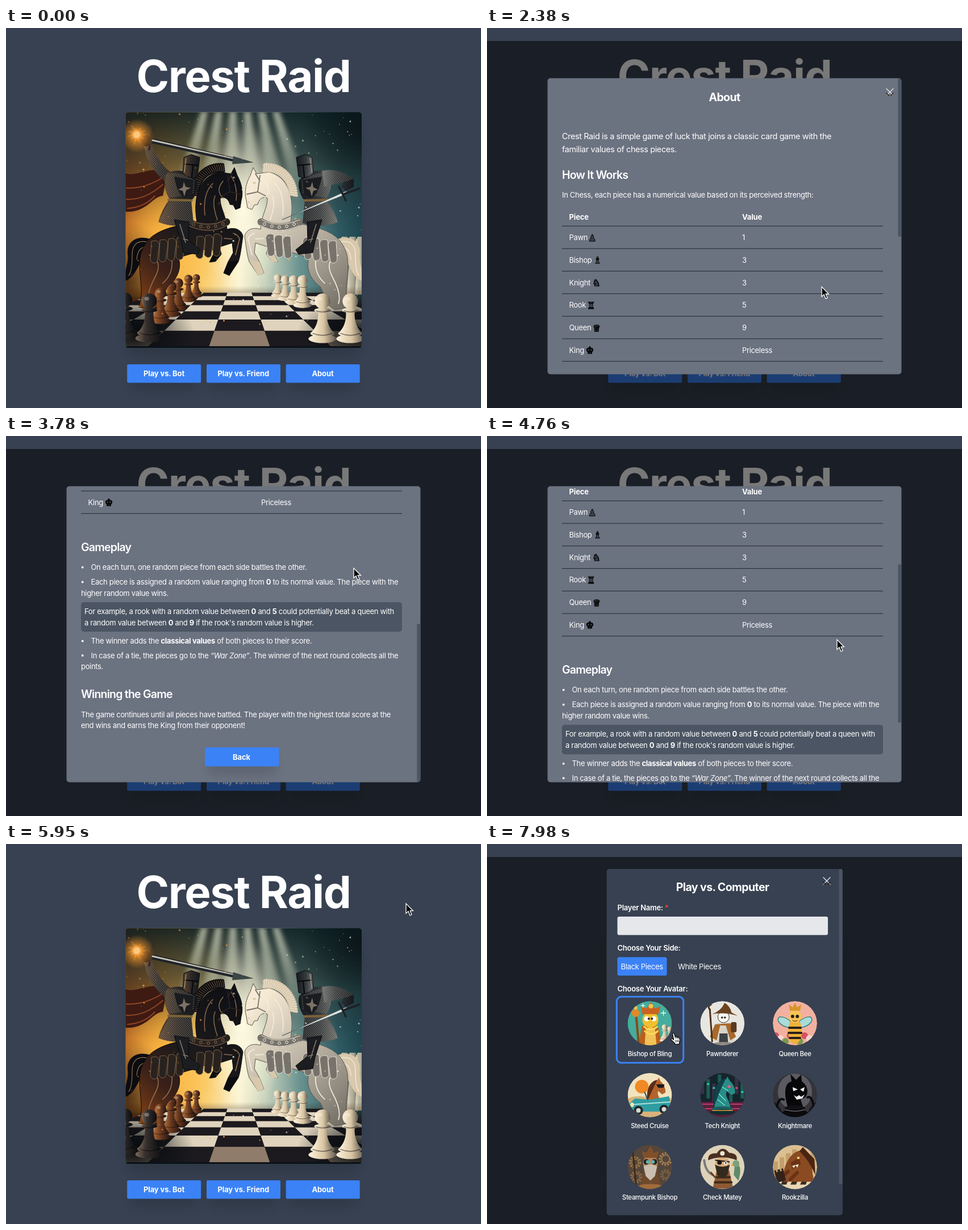
Recreate the animation shown at these times as an HTML page. Size 836x670 px, loop 8000 ms.

```html
<!DOCTYPE html>
<html lang="en">
<head>
<meta charset="utf-8">
<title>Crest Raid</title>
<style>
html, body { margin: 0; width: 100%; height: 100%; overflow: hidden; background: #374151; }
svg { display: block; width: 100vw; height: 100vh; }
text { font-family: Inter, "Open Sans", sans-serif; font-size: 13px; letter-spacing: -.025em; fill: #fff; }
.b { font-weight: 700; letter-spacing: -.01em; }
.h { font-size: 19.5px; font-weight: 600; letter-spacing: -.04em; }
.t { font-size: 19.5px; font-weight: 700; letter-spacing: -.03em; }
.l { font-weight: 600; letter-spacing: -.02em; }
.s { font-size: 11.4px; font-weight: 500; }
.m { text-anchor: middle; }
.g { font: 16.5px "DejaVu Sans", sans-serif; fill: #3c4047; stroke: #000; stroke-width: .8; }
</style>
</head>
<body>
<script>
const BLUE = '#3b82f6';
const text = (x, y, s, cls = '') => `<text x="${x}" y="${y}" class="${cls}">${s}</text>`;
const bold = s => `<tspan font-weight="700">${s}</tspan>`;
const rect = (x, y, w, h, fill, r = 0, more = '') =>
  `<rect x="${x}" y="${y}" width="${w}" height="${h}" rx="${r}" fill="${fill}" ${more}/>`;
const circle = (x, y, r, fill, more = '') => `<circle cx="${x}" cy="${y}" r="${r}" fill="${fill}" ${more}/>`;
const oval = (x, y, rx, ry, fill, more = '') =>
  `<ellipse cx="${x}" cy="${y}" rx="${rx}" ry="${ry}" fill="${fill}" ${more}/>`;
const path = (d, fill, more = '') => `<path d="${d}" fill="${fill}" ${more}/>`;
const line = (d, stroke, w, more = '') => path(d, 'none', `stroke="${stroke}" stroke-width="${w}" stroke-linecap="round" ${more}`);
const group = (s, more = '') => `<g ${more}>${s}</g>`;
const range = n => [...Array(n).keys()];
const shadow = (x, y, w, h) => rect(x + 4, y + 22, w - 8, h - 8, '#000', 12, 'opacity=".13" filter="url(#soft)"');
const gradient = (id, stops, dir = '') => `<linearGradient id="${id}" ${dir}>` +
  stops.map(([o, c, a = 1]) => `<stop offset="${o}" stop-color="${c}" stop-opacity="${a}"/>`).join('') + '</linearGradient>';
const glow = (id, c) => `<radialGradient id="${id}"><stop offset="0" stop-color="${c}"/>` +
  `<stop offset="1" stop-color="${c}" stop-opacity="0"/></radialGradient>`;

let seed = 7;
const rnd = () => (seed = (seed * 16807) % 2147483647) / 2147483647;

const down = 'x2="0" y2="1"';
const rise = 'x1="0" y1="1" x2=".7" y2="0"';
const defs = `<defs>
<filter id="soft" x="-60%" y="-300%" width="220%" height="700%"><feGaussianBlur stdDeviation="10"/></filter>
<filter id="haze"><feGaussianBlur stdDeviation="4"/></filter>
<clipPath id="art"><rect x="210.5" y="148.5" width="415.5" height="415.5" rx="5"/></clipPath>
<clipPath id="card"><rect x="106.5" y="88.5" width="623" height="522" rx="5"/></clipPath>
<clipPath id="disc"><circle r="39"/></clipPath>
<pattern id="mail" width="4" height="4" patternUnits="userSpaceOnUse"><path d="M0 1q1 2 2 0t2 0M-1 3q1 2 2 0t2 0t2 0" fill="none" stroke="#b9ab98" stroke-width=".6" opacity=".55"/></pattern>` +
  gradient('sky', [[0, '#b55a1a'], [.15, '#e8952f'], [.32, '#f8cf76'], [.48, '#fbf4d2'], [.6, '#c2cfba'], [.74, '#68918f'], [.9, '#2f5a63'], [1, '#1e4650']]) +
  gradient('top', [[0, '#0b1c20', .92], [.2, '#1a2725', .66], [.5, '#1a2725', 0]], down) +
  gradient('ray', [[0, '#eef3d8', .85], [1, '#eef3d8', 0]], down) +
  gradient('floor', [[0, '#2a1408', 0], [.4, '#1c1210', .9], [1, '#0a0d12']], down) +
  gradient('dark', [[0, '#7d6a58'], [.35, '#37302e'], [1, '#0b0c10']]) +
  gradient('brown', [[0, '#c27a40'], [.5, '#6a3a20'], [1, '#21120e']]) +
  gradient('light', [[0, '#fff4de'], [.55, '#d9c5a2'], [1, '#5f594f']]) +
  gradient('black', [[0, '#8a4416'], [.3, '#3a2018'], [.55, '#1d1a1c'], [1, '#101116']], rise) +
  gradient('white', [[0, '#6d6960'], [.35, '#a39c90'], [.6, '#c4bbab'], [1, '#f6ead4']], rise) +
  gradient('coat', [[0, '#5e4630'], [.5, '#2c2827'], [1, '#15161a']]) +
  gradient('steel', [[0, '#6e7170'], [.45, '#33383c'], [1, '#15191d']]) +
  glow('fire', '#ff9a2c') + glow('sun', '#fffbe2') + glow('amber', '#ffc04a') + glow('night', '#050a0e') + '</defs>';

// Cover picture
const pawn = (x, y, h, fill) => group(
  path('M-9-64C-8-40-14-30-22-20H22C14-30 8-40 9-64Z', `url(#${fill})`) +
  circle(0, -84, 16, `url(#${fill})`) + oval(0, -65, 17, 5, `url(#${fill})`) +
  oval(0, -17, 25, 7, `url(#${fill})`) + oval(0, -6, 29, 9, `url(#${fill})`) +
  line('M-20-17Q0-9 20-17M-13-64Q0-59 13-64', '#000', 2, 'opacity=".45"') + oval(-5, -89, 5, 4, '#fff', 'opacity=".3"'),
  `transform="translate(${x} ${y}) scale(${h / 100})"`);

// A crest of hair strands around the neck
const strands = (c, w) => range(22).map(i => {
  const a = 3.25 + i * .078, x = 376 + 40 * Math.cos(a), y = 298 + 46 * Math.sin(a);
  return line(`M${x.toFixed(1)} ${y.toFixed(1)}l${(11 * Math.cos(a - .3)).toFixed(1)} ${(12 * Math.sin(a - .3)).toFixed(1)}`, c, w);
}).join('');

const horse = (fill, mane, trim, shine, edge) =>
  path('M262 376C238 362 212 372 214 398C217 418 205 430 211 446C232 436 234 408 250 394Z', mane) +
  line('M254 378Q222 370 222 400T216 436M250 386Q232 384 230 408', shine, 1.2) +
  path('M336 342C328 296 342 262 374 254L396 257 402 246 407 260C415 274 418 290 414 304L412 317 404 320 400 312 394 311C392 302 385 296 377 300C376 316 388 330 389 355C404 350 415 357 417 367C414 387 413 400 409 412L393 436 383 432 391 412 400 396 398 379 376 386 379 399 369 411 358 413 366 397 361 385C338 398 318 398 304 406C310 428 298 446 284 456L268 490 258 497 234 492 238 472C240 440 226 408 246 380C262 354 304 348 336 342Z', fill, `stroke="${edge}"`) +
  strands(mane, 5) + strands(shine, .8) +
  line('M396 260Q408 280 405 304M382 300Q368 286 382 270M350 330Q346 292 364 274M372 338Q362 310 368 296', shine, 1.4) +
  line('M400 362Q408 364 411 372L404 400M384 371L398 372M252 400Q278 410 262 440T252 486M292 410Q294 434 276 450', shine, 1.6) +
  path('M409 410L393 437 383 432 391 412ZM379 399L369 412 358 413 366 397Z', mane) +
  line('M320 342Q358 360 388 342', trim, 13) + line('M320 338Q358 354 387 338M320 348Q358 366 389 348', shine, 1) +
  range(5).map(i => circle(330 + i * 13, 346 + 5 * Math.sin(i * .8), 2.4, 'none', `stroke="${shine}"`)).join('') +
  line('M390 260L394 289 413 293M394 289L380 296M398 257L390 270', trim, 1.8) + oval(400, 273, 2.6, 2, mane) + circle(410, 307, 1.4, mane) +
  range(7).map(i => path(`M${256 + i * 15 + (i > 3 ? 20 : 0)} ${376 - i * 2}q12-4 14 6l-4 30q-6 6-12-2Z`, trim, `stroke="${shine}" stroke-width=".8"`)).join('');

const rider = coat =>
  path('M280 258Q300 246 322 256L336 268Q340 282 330 300L326 304 330 344Q296 354 268 342Q274 320 288 302Q276 282 280 258Z', coat) +
  path('M282 258Q300 250 332 268L330 292 288 300Q276 280 282 258ZM288 304L326 304 330 344Q296 354 268 342Z', 'url(#mail)') +
  path('M296 262L330 268 328 294 316 300Q302 296 296 262Z', '#1b1c20') + line('M286 303L327 304', '#7d6238', 4) +
  path('M313 228L326 223 341 228 337 262Q324 268 311 256Z', coat, 'stroke="#0c0d10"') +
  line('M315 240L338 242M329 242L327 262', '#08090b', 2.2) + line('M317 230L314 254', '#a99a86', 1.2) +
  path('M296 338L322 342 321 374 342 391 337 399 312 396 308 376Z', '#1c1d21', 'stroke="#08090b"') + line('M306 346L316 378M312 372L320 374', '#857868', 1.6) +
  path('M313 271l3 9 9 2-8 4-3 11-3-10-8-2 8-4Z', '#8d8272', 'opacity=".85"');

const row = k => 405 + 1 / (.00637 + .0014 * k);
const tile = (c, k) => {
  const at = (i, y) => `${411 + (i - .5) * 109 * (y - 405) / 159} ${y}`, a = row(k), b = row(k + 1);
  const lit = (c + k) % 2 === 0;
  return path(`M${at(c, a)}L${at(c + 1, a)} ${at(c + 1, b)} ${at(c, b)}Z`, lit ? (k ? '#dfd3bd' : '#8f7c6a') : '#1c1a1e');
};
const board = rect(210, 455, 416, 110, 'url(#floor)') +
  range(7).map(k => range(7).map(c => tile(c - 3, k)).join('')).join('') +
  oval(222, 540, 110, 70, 'url(#night)') + oval(622, 540, 110, 70, 'url(#night)');

const sparks = range(260).map(() => {
  const x = 210 + rnd() * 416, y = 150 + rnd() * 380, warm = x < 400 || rnd() < .12;
  return circle(x.toFixed(1), y.toFixed(1), (.3 + rnd() * rnd() * 1.6).toFixed(1), warm ? '#ffa23f' : '#e8efe6', `opacity="${(.3 + rnd() * .6).toFixed(2)}"`);
}).join('');

const cover = group(
  rect(210, 148, 417, 417, 'url(#sky)') + rect(210, 148, 417, 417, 'url(#top)') +
  oval(290, 390, 120, 120, 'url(#amber)') + oval(418, 320, 80, 150, 'url(#sun)') +
  oval(214, 450, 80, 110, 'url(#night)', 'opacity=".6"') + oval(630, 180, 110, 90, 'url(#night)', 'opacity=".6"') +
  group(range(6).map(i => path(`M${344 + i * 25} 146h11L${322 + i * 44} 310h-32Z`, 'url(#ray)')).join(''), 'filter="url(#haze)" opacity=".8"') +
  path('M210 256C232 264 254 240 284 256L276 296C258 296 248 326 210 324Z', '#3d1a12') +
  line('M212 282Q246 284 278 262M212 302Q244 304 276 276M214 318Q244 316 262 296', '#8a4424', 2) +
  range(3).map(i => path(`M${586 + i * 14} 470l5-70-5-22 5-10h10l5 10-5 22 6 70Z`, 'url(#light)', 'opacity=".75"')).join('') +
  board +
  [[335, 474, 40], [321, 482, 47], [303, 497, 56], [290, 508, 62]].map(p => pawn(...p, 'brown')).join('') +
  [[478, 474, 40], [491, 480, 44], [506, 486, 50], [522, 492, 56]].map(p => pawn(...p, 'light')).join('') +
  group(horse('url(#white)', '#d8c8ac', '#77736c', '#f7efdf', '#5a554d'), 'transform="matrix(-1 0 0 1 837 0)"') +
  horse('url(#black)', '#0c0c10', '#28221f', '#8f6f50', '#0c0a0a') +
  pawn(272, 520, 62, 'brown') +
  path('M292 256Q276 246 264 222L256 202 242 206 248 228Q260 256 282 272Z', 'url(#coat)') + path('M292 256Q276 246 264 222L256 202 242 206 248 228Q260 256 282 272Z', 'url(#mail)') +
  oval(247, 199, 8, 10, '#2a211c') + rider('url(#coat)') +
  group(rider('url(#steel)'), 'transform="matrix(-1 0 0 1 852 0)"') +
  path('M556 252Q584 246 612 266L612 280 598 288 590 280 594 272 560 280Z', 'url(#steel)') + path('M556 252Q584 246 612 266L594 272 560 280Z', 'url(#mail)') +
  path('M256 194L404 229 402 236 255 203Z', '#20242a') + path('M256 196L404 230 404 232 256 199Z', '#c8c4b8') +
  path('M400 226L436 237 398 240Z', '#3b4646') + line('M258 178L252 214', '#3a2a20', 4) +
  path('M600 287L596 294 486 338Z', '#dfe4e2', 'stroke="#3c4a4e" stroke-width=".7"') + line('M586 280L598 304M594 293L622 283', '#1d2126', 3.5) +
  circle(231, 190, 30, 'url(#fire)') + circle(230, 188, 14, 'url(#fire)') + circle(230, 188, 9, 'url(#sun)') +
  range(11).map(i => line(`M230 188l${(16 * Math.cos(i * 2.3)).toFixed(1)} ${((9 + i) * Math.sin(i * 2.3)).toFixed(1)}`, '#ffb347', .8, 'opacity=".7"')).join('') +
  sparks +
  pawn(209, 548, 82, 'dark') + pawn(252, 552, 84, 'dark') + pawn(557, 553, 85, 'light') + pawn(606, 553, 85, 'light') +
  rect(210, 561, 417, 4, '#0b1218'), 'clip-path="url(#art)"');

const buttons = [['Play vs. Bot', 213.2], ['Play vs. Friend', 353], ['About', 492.7]].map(([s, x], i) =>
  shadow(x, 593, 130, 32.5) + rect(x, 593, 130, 32.5, BLUE, 2, `id="btn${i}"`) + text(x + 64.8, 614, s, 'b m')).join('');

const home = `<text x="418" y="113" class="m" style="font-size:78px;font-weight:700;letter-spacing:-.018em">Crest Raid</text>` +
  shadow(210.5, 148.5, 415.5, 415.5) + cover + buttons;

// About panel, laid out as it stands when scrolled to the end
const swords = (x, y) => group(
  line('M-6-6L5 5M6-6L-5 5', '#e5e7eb', 1.4) + line('M2 6L6 2M-2 6L-6 2', '#15181d', 1.4) + line('M5 5l2 2M-5 5l-2 2', '#8a7350', 1.6),
  `transform="translate(${x} ${y})"`);
const pieces = [['Pawn', 1, '♟', 178], ['Bishop', 3, '♝', 187], ['Knight', 3, '♞', 185], ['Rook', 5, '♜', 176], ['Queen', 9, '♛', 185.5], ['King', 'Priceless', '♚', 173.5]];
const rows = pieces.map(([name, value, icon, x], i) => {
  const y = -77 + i * 39.75;
  return text(144.5, y, name) + `<text x="${x}" y="${y + 1.5}" class="g">${icon}</text>` + text(449, y, value);
}).join('') + range(7).map(i => rect(132, -102.3 + i * 39.75, 565, 1, '#1f2937')).join('');
const bullet = (y, s) => circle(134.7, y - 4.5, 1.9, '#fff') + text(149.5, y, s);
const lead = (y, s) => `<text x="132" y="${y}" style="font-size:14.4px">${s}</text>`;

const about = text(418, -322, 'About', 't m') + swords(709, -338) +
  lead(-255, 'Crest Raid is a simple game of luck that joins a classic card game with the') +
  lead(-232.5, 'familiar values of chess pieces.') +
  text(132, -185.5, 'How It Works', 'h') +
  text(132, -152.5, 'In Chess, each piece has a numerical value based on its perceived strength:') +
  text(144.5, -113.5, 'Piece', 'b') + text(449, -113.5, 'Value', 'b') + rows +
  text(132, 202.5, 'Gameplay', 'h') +
  bullet(236, 'On each turn, one random piece from each side battles the other.') +
  bullet(262, `Each piece is assigned a random value ranging from ${bold('0')} to its normal value. The piece with the`) +
  text(132, 281.5, 'higher random value wins.') +
  rect(132, 293, 565, 52, '#4b5563', 5) +
  text(138, 314, `For example, a rook with a random value between ${bold('0')} and ${bold('5')} could potentially beat a queen with`) +
  text(138, 333.5, `a random value between ${bold('0')} and ${bold('9')} if the rook's random value is higher.`) +
  bullet(366, `The winner adds the ${bold('classical values')} of both pieces to their score.`) +
  bullet(391.5, 'In case of a tie, the pieces go to the <tspan font-style="italic">“War Zone”</tspan>. The winner of the next round collects all the') +
  text(132, 411, 'points.') +
  text(132, 462, 'Winning the Game', 'h') +
  text(132, 495.5, 'The game continues until all pieces have battled. The player with the highest total score at the') +
  text(132, 515, 'end wins and earns the King from their opponent!') +
  shadow(350, 549, 130.5, 33.5) + rect(350, 549, 130.5, 33.5, BLUE, 2.5) + text(414.5, 570.5, 'Back', 'b m');

// Avatars, drawn around their centre
const eyes = (x, y, r, c) => circle(x - r * 1.4, y, r, c) + circle(x + r * 1.4, y, r, c);
const steed = 'M-14 22C-18-4-12-26 6-28L9-34 13-26C20-20 24-10 23-3L16 1 8-6C4 2 14 10 15 22Z';
const gear = (x, y, r, c) => circle(x, y, r, 'none', `stroke="${c}" stroke-width="4" stroke-dasharray="3 2"`) + circle(x, y, r - 3, 'none', `stroke="${c}" stroke-width="1.5"`);
const avatars = [
  ['Bishop of Bling', '#45ad9d', path('M-20 39L-14 4H14L22 39Z', '#b9601c') + path('M-7 8H9L12 39H-9Z', '#f0c257') +
    circle(1, -6, 14, '#f2bf2d') + path('M-13-16L-16-30-6-26 2-37 9-26 19-30 15-16Z', '#c8641f') + circle(2, -30, 4, '#f5c24c') +
    eyes(1, -8, 4.5, '#fff') + eyes(1, -8, 2, '#222') + line('M-10 6Q1 16 13 6M-9 14Q2 24 14 14', '#ffd85a', 3) +
    line('M-24-14L-20 32', '#8a4a14', 4) + circle(-25, -18, 7, '#e08a2a') + circle(-25, -27, 3, '#f5c24c') + pawn(26, 32, 30, 'light') + pawn(35, 30, 24, 'light') +
    line('M-12-28v-6M-15-31h6M24-22v8M20-18h8', '#eafff4', 1.3)],
  ['Pawnderer', '#e8e6e1', path('M-15 32L-11 0H13L22 34Z', '#d8d3c9') + path('M-13 2L-22 24-10 30-4 4 6 4 14 30 24 24 14 0Z', '#a8692c') +
    circle(2, -11, 10, '#faf8f2', 'stroke="#3a3028"') + path('M-18-16Q-2-22 4-36Q14-30 16-19L27-13Q4-20-18-16Z', '#6b431f') +
    eyes(2, -10, 1.8, '#222') + rect(15, -2, 10, 18, '#5a3a20', 3) + line('M-22-24L-18 32', '#4a3018', 3) + line('M-22-24q-5-6 2-9', '#4a3018', 3) +
    path('M-5 18H9L10 36H-6Z', '#3c4148') + oval(2, 36, 18, 3, '#8f8a82')],
  ['Queen Bee', '#f2b1a0', range(9).map(i => circle(-34 + i * 8.5, 22 + (i % 3) * 5, 6, ['#d94f62', '#f6d4d0', '#7a9a4c'][i % 3])).join('') +
    path('M-8-4C-36-24-38 4-9 8ZM8-4C36-24 38 4 9 8Z', '#a7dcd8', 'stroke="#3c7f80" stroke-width="1.5"') +
    oval(0, 14, 12, 23, '#eeb23a') + line('M-10 8H10M-11 17H11M-9 26H9', '#2c2018', 4) + circle(0, -12, 11, '#f6c552') +
    eyes(0, -12, 3, '#2c2018') + path('M-9-22L-11-33-4-28 0-36 4-28 11-33 9-22Z', '#d9962a') + line('M-4 -5Q0-2 4-5', '#8a3a22', 1.3)],
  ['Steed Cruise', '#f1e3c0', circle(-14, -15, 12, '#f08a24') + path('M-39 6Q-20-2 0 6T39 4V39H-39Z', '#d9b27a') +
    group(path(steed, '#b5622c') + path('M-14 14C-18-12-6-28 6-29L-2-12Z', '#5a2c18') + path('M4-20H21L19-13H8Z', '#17191c'), 'transform="translate(8 -2) scale(.85)"') +
    path('M-37 16L-26 6 0 8 34 2 38 22 30 29H-34Z', '#2f9da2') + line('M-34 17L36 12', '#a9e0d8', 2) + line('M-4 8L-9-5', '#2a5560', 2) +
    circle(-20, 27, 8, '#22262b') + circle(-20, 27, 4, '#d9d9d4') + circle(25, 25, 8, '#22262b') + circle(25, 25, 4, '#d9d9d4') + oval(-31, 17, 3, 4, '#f7e7a8')],
  ['Tech Knight', '#16242b', range(8).map(i => rect(-38 + i * 10, -36 + (i % 3) * 8, 6, 34, i % 2 ? '#1f5a55' : '#3a3048') + rect(-37 + i * 10, -28 + (i % 4) * 7, 4, 3, i % 3 ? '#29d3a8' : '#e0457a')).join('') +
    rect(-39, 12, 78, 28, '#5a1f3c') + line('M-38 16H38M-38 24H38', '#f0508a', 1.2) +
    path(steed, '#2a8c88', 'stroke="#0c1c20"') + path('M-14 18C-18-12-6-28 6-29L-4-8Z', '#124148') + circle(12, -15, 2.5, '#ff5b78') +
    line('M-6-2L6 10M-8 8L4 18M0-14L10-8', '#6bf0d0', 1.3) + oval(0, 24, 18, 4, '#1b5f60') + oval(0, 30, 22, 5, '#0e2f33') + line('M-18 27H18', '#e8a23c', 1.5)],
  ['Knightmare', '#34333a', oval(0, -6, 30, 32, '#77757c', 'opacity=".6"') + path('M-39 10Q-24 20-20 39H-39ZM39 10Q24 20 20 39H39Z', '#17161a') +
    path('M-13 20C-20-4-18-22-6-24L-8-37 2-27 11-36 12-24C24-16 24-2 18 4L10 8 14 20Z', '#08080b') +
    path('M-4-14L5-10-3-7ZM9-10L17-14 15-6Z', '#fff') + path('M-2 0L3 3 7 0 11 3 17-1 13 6 3 8Z', '#f2f2f2') +
    line('M-34 26Q-28 2-20 8M34 24Q30 0 22 4', '#0b0b0e', 4) + oval(0, 23, 18, 5, '#111115') + oval(0, 32, 23, 7, '#0a0a0d') + line('M-16 26Q0 31 16 26', '#8b8a92', 1)],
  ['Steampunk Bishop', '#54463a', gear(-26, -8, 9, '#9b7448') + gear(28, -14, 10, '#a77f52') + gear(28, 14, 8, '#7d6246') + gear(-24, 18, 9, '#8d6a45') +
    path('M-18 36L-10 2H12L20 36Z', '#6e4a2c') + circle(1, -7, 13, '#b98a5c') + path('M-11-16L-14-28-6-25 1-37 8-25 16-28 13-16Z', '#80502a') +
    eyes(1, -9, 5, '#2a211b') + eyes(1, -9, 3.2, '#5fb3b0') + path('M-11-1Q1-8 13-1L9 16 1 24-7 16Z', '#c9bfb0') + line('M-30-28L-24 34', '#3b2a1e', 3) + oval(1, 35, 22, 5, '#a06c3c')],
  ['Check Matey', '#ded2b8', path('M-17 38L-10 6H12L19 38Z', '#8c5a34') + line('M-10 18H13M-13 27H16', '#40291a', 4) +
    circle(0, -5, 13, '#d9ad7c') + path('M-13-4Q0 3 13-4L9 14 0 20-9 14Z', '#33291f') + path('M-25-12Q-26-25-10-24Q0-40 12-25Q28-24 25-12Q0-22-25-12Z', '#4a2f20') +
    circle(0, -24, 4, '#eee6d6') + line('M-12-12L12-9', '#191512', 2) + circle(-5, -8, 4, '#191512') + circle(6, -7, 3, '#fff') + circle(6, -7, 1.4, '#222') +
    path('M22-4C32-8 34 8 28 24L20 14Z', '#5f8a6a') + circle(24, -6, 6, '#7ba07c') + path('M19-6l-4 3 5 2Z', '#d9a53c') + line('M-32-12Q-30 8-17 14', '#777b7c', 4) + line('M-20 10L-13 18', '#6b3f1c', 3)],
  ['Rookzilla', '#dcbf91', range(7).map(i => rect(-38 + i * 11, -10 - (i * 7) % 22, 8, 40, '#c39f6c')).join('') +
    rect(-39, 22, 78, 18, '#e8d6b4') + range(5).map(i => path(`M${-38 + i * 17} 23h9l-3 8h-10Z`, '#3a2a20')).join('') +
    path('M-20 26C-24 2-8-28 10-29L14-35 18-27C30-22 34-8 30 6L34 26Z', '#8a4a22') + path('M8-28L14-35 34-14 36 14Q26-10 8-28Z', '#4a2412') +
    path('M-8-8L8-16 10-4-4 4Z', '#6a3214') + path('M-5-2l3 4 3-5 3 4 3-6Z', '#fff3dc') + circle(6, -16, 2.2, '#ffdc7a') + line('M-12 8L-24 18M4 10L-8 22', '#6a3214', 6) +
    path('M-34 26V4H-31V8H-28V4H-24V8H-21V4H-18V26Z', '#33221a', 'transform="rotate(-14 -26 16)"')],
].map(([name, bg, art], i) => {
  const x = 286.5 + (i % 3) * 127.75, y = 316 + Math.floor(i / 3) * 126.7;
  return group(circle(0, 0, 39, bg) + art, `clip-path="url(#disc)" transform="translate(${x} ${y})"`) + text(x, y + 58, name, 's m');
}).join('');

const play = rect(210.5, 44, 415.5, 610.5, '#374151', 5) + rect(619.5, 44, 6, 556, '#4b5563', 3) +
  text(414.5, 83, 'Play vs. Computer', 't m') + swords(598, 65) +
  text(229.5, 117, 'Player Name: <tspan fill="#f04a3a">*</tspan>', 'l') + rect(229.5, 128, 370.5, 32.5, '#e5e7eb', 3) +
  text(229.5, 188, 'Choose Your Side:', 'l') + rect(229.5, 199.5, 87, 32.5, BLUE, 3) +
  text(235.5, 220.5, 'Black Pieces') + text(336, 220.5, 'White Pieces') +
  text(229.5, 259.5, 'Choose Your Avatar:', 'l') +
  rect(228.3, 269.3, 117.4, 116.4, 'none', 8, `stroke="${BLUE}" stroke-width="3"`) + avatars;

const dim = rect(0, 23, 836, 647, '#000', 0, 'opacity=".53"');
document.body.innerHTML = `<svg viewBox="0 0 836 670">${defs}${rect(0, 0, 836, 670, '#374151')}${home}
<g id="about">${dim}<g clip-path="url(#card)">${rect(106, 88, 624, 523, '#6b7280')}<g id="page">${about}</g>
${rect(723.3, 331, 6.2, 279.5, '#4b5563', 3, 'id="thumb"')}</g></g>
<g id="play">${dim}${play}</g>
<g id="cursor">
${path('M1 1V18.2L5 14.6 8 21.8 11 20.5 8.1 13.7H13.4Z', '#000', 'id="arrow" stroke="#fff" stroke-width="1.3"')}
<g id="hand" stroke="#000" stroke-width="1.2">
${path('M3.6 2.2C3.9.6 6 .6 6.6 2.2L8.2 7.4C8.6 6.3 10.4 6.4 10.8 7.8 11.3 6.9 13 7.2 13.3 8.5 14 7.8 15.4 8.3 15.7 9.6 16.8 12.6 16.6 14.8 15.6 17L15.7 20 8.2 20.8 7.6 18.8C5.4 17 3.4 14.6 1.2 12.6 .2 11.2 1.6 10 3 10.8L5.6 12.6Z', '#fff')}
${line('M8.2 7.4L8.9 10.4M10.8 7.8L11.4 10.4M13.3 8.5L13.8 10.8M8.8 13.5L9.4 17M11.2 13.2L11.7 16.6M13.5 13L13.9 16.2', '#000', .9)}
</g></g></svg>`;

// Motion
const $ = id => document.getElementById(id);
const LOOP = 8000, MAX = 451;
const ramp = (t, a, b) => Math.min(1, Math.max(0, (t - a) / (b - a)));
const ease = (t, a, b) => { const p = ramp(t, a, b); return p * p * (3 - 2 * p); };
const within = (t, spans) => spans.some(([a, b]) => t >= a && t < b);
const scroll = t => MAX * (ease(t, 2980, 3500) - ease(t, 4445, 5095));
const moves = [[0, 604, 676], [40, 604, 676], [800, 572, 612], [2050, 572, 612], [2800, 611, 232], [3880, 611, 232], [4200, 615, 358],
  [5080, 615, 358], [5520, 703, 104], [5990, 703, 104], [6790, 304, 588], [6880, 304, 588], [7050, 270, 604], [7620, 270, 604], [7980, 323, 332.5], [8000, 323, 332.5]];
const hands = [[740, 2080], [5460, 5700], [6950, 7360], [7780, LOOP]];
const mix = p => `rgb(${59 - 30 * p},${130 - 52 * p},${246 - 30 * p})`;
const show = (id, a) => {
  $(id).style.display = a ? '' : 'none';
  $(id).style.opacity = a;
};

function draw(t) {
  show('about', ramp(t, 1990, 2170) * (1 - ramp(t, 5680, 5850)));
  show('play', ramp(t, 7290, 7440));
  $('page').setAttribute('transform', `translate(0 ${MAX - scroll(t)})`);
  $('thumb').setAttribute('y', 88.5 + scroll(t - 20) * 242.5 / MAX);
  $('btn2').setAttribute('fill', mix(ramp(t, 790, 980) - ramp(t, 2000, 2150)));
  $('btn0').setAttribute('fill', mix(ramp(t, 6930, 7080)));
  const i = Math.max(1, moves.findIndex(m => m[0] > t));
  const [a, x, y] = moves[i - 1], [b, u, v] = moves[i], p = ease(t, a, b);
  $('cursor').setAttribute('transform', `translate(${x + (u - x) * p} ${y + (v - y) * p})`);
  const hand = within(t, hands);
  $('hand').style.display = hand ? '' : 'none';
  $('arrow').style.display = hand ? 'none' : '';
}

const start = performance.now();
function tick() {
  draw((performance.now() - start) % LOOP);
  requestAnimationFrame(tick);
}
tick();
</script>
</body>
</html>
```
